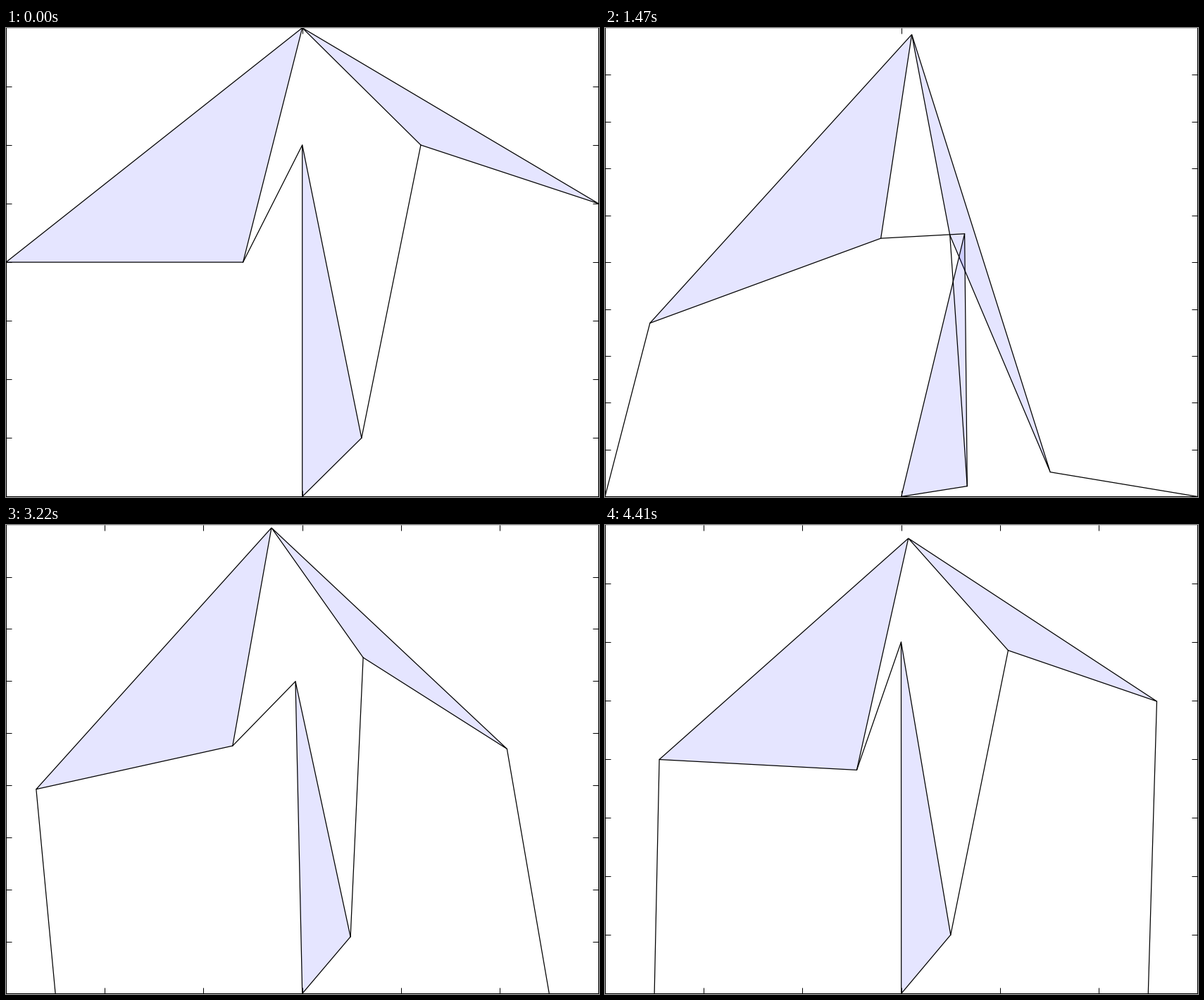
Animation, 842 px wide and 665 px high, one loop 4480 ms. Source, as a matplotlib script:

```python
import numpy as np
import matplotlib.pyplot as plt
from matplotlib.animation import FuncAnimation
from matplotlib.patches import Polygon

W, H, DPI = 842, 665, 100
PX = 72 / DPI
FRAMES, INTERVAL = 64, 70
LEFT, RIGHT, TOP, BOTTOM = 0.0, 841.4, -0.2, 664.4
TICK = 8.4

# Double butterfly linkage: three rigid triangles, four bars, three ground pivots.
PIVOT, FOOT_L, FOOT_R = 0j, -5 + 0j, 5 + 0j
CRANK = 2.5
FIRST_ANGLE, STEP, POSES, START_POSE = 66, 4, 32, 6
SUBSTEPS = 8
TRIANGLES = [(0, 1, 2), (0, 3, 4), (5, 6, 7)]
BARS = [(1, 8), (2, 6), (3, 7), (4, 9)]


def joints(turns, angle):
    """Top, left, left inner, right inner, right, middle, base, ground pivots."""
    a, b, c = np.exp(1j * np.asarray(turns))
    right = FOOT_R + CRANK * np.exp(1j * np.radians(angle))
    top = right - a * (5 - 1.5j)
    return np.array([top, top + b * (-5 - 2j), top + b * (-1 - 2j),
                     top + a * (2 - 1j), right, PIVOT,
                     c * 3j, c * (1 + 0.5j), FOOT_L, FOOT_R])


def residual(turns, angle):
    p = joints(turns, angle)
    bars = [p[i] - p[j] for i, j in BARS[:3]]
    return np.abs(bars) ** 2 - np.array([4, 2, 7.25])


def solve(guess, angle):
    turns, h = guess.copy(), 1e-6
    for _ in range(8):
        error = residual(turns, angle)
        if np.abs(error).max() < 1e-11:
            break
        jac = np.column_stack([
            (residual(turns + d, angle) - residual(turns - d, angle)) / (2 * h)
            for d in h * np.eye(3)])
        turns = turns - np.linalg.solve(jac, error)
    return turns


def trace(last_pose):
    """Follow the motion from the upright crank to the given pose."""
    direction = np.sign(last_pose - START_POSE)
    start = FIRST_ANGLE + STEP * START_POSE
    now = before = np.zeros(3)
    found = {START_POSE: joints(now, start)}
    for n in range(1, abs(last_pose - START_POSE) * SUBSTEPS + 1):
        angle = start + direction * n * STEP / SUBSTEPS
        now, before = solve(2 * now - before, angle), now
        if n % SUBSTEPS == 0:
            found[START_POSE + direction * n // SUBSTEPS] = joints(now, angle)
    return found


poses = {**trace(0), **trace(POSES - 1)}


def rounded(values, step):
    lo = np.floor(values.min() / step + 1e-4) * step
    hi = np.ceil(values.max() / step - 1e-4) * step
    return lo, hi, step


def axis_limits(points):
    x, y = points.real, points.imag
    x_step = 5 if np.ptp(x) < 10.0005 else 2
    y_step = 0.5 if y.min() > -1e-4 and y.max() < 5.0001 else 1
    return rounded(x, x_step), rounded(y, y_step)


def scale(values, limits, start, end):
    lo, hi, _ = limits
    return start + (values - lo) / (hi - lo) * (end - start)


def inner_ticks(limits):
    lo, hi, step = limits
    return lo + step * np.arange(1, round((hi - lo) / step))


fig = plt.figure(figsize=(W / DPI, H / DPI), dpi=DPI, facecolor="white")
ax = fig.add_axes([0, 0, 1, 1])
ax.set(xlim=(0, W), ylim=(H, 0))
ax.axis("off")

ax.plot([LEFT, RIGHT], [TOP, TOP], color="0.82", lw=PX)
ax.plot([LEFT, LEFT, RIGHT, RIGHT], [0, BOTTOM, BOTTOM, 0], color="black", lw=PX)
ticks, = ax.plot([], [], color="black", lw=PX, solid_capstyle="butt")
plates = [ax.add_patch(Polygon(np.zeros((3, 2)), facecolor=(0, 0, 1, 0.1),
                               edgecolor="black", lw=1.25 * PX, zorder=3))
          for _ in TRIANGLES]
rods = [ax.plot([], [], color="black", lw=1.25 * PX, zorder=4)[0] for _ in BARS]


def tick_marks(x_limits, y_limits):
    segments = []
    for x in scale(inner_ticks(x_limits), x_limits, LEFT, RIGHT):
        segments += [(x, BOTTOM), (x, BOTTOM - TICK), (np.nan, np.nan),
                     (x, TOP), (x, TOP + TICK), (np.nan, np.nan)]
    for y in scale(inner_ticks(y_limits), y_limits, BOTTOM, TOP):
        segments += [(LEFT, y), (LEFT + TICK, y), (np.nan, np.nan),
                     (RIGHT, y), (RIGHT - TICK, y), (np.nan, np.nan)]
    return np.array(segments).T


def update(frame):
    phase = (frame + START_POSE) % FRAMES
    points = poses[min(phase, FRAMES - 1 - phase)]
    x_limits, y_limits = axis_limits(points)
    xy = np.column_stack([scale(points.real, x_limits, LEFT, RIGHT),
                          scale(points.imag, y_limits, BOTTOM, TOP)])
    ticks.set_data(*tick_marks(x_limits, y_limits))
    for plate, corners in zip(plates, TRIANGLES):
        plate.set_xy(xy[list(corners)])
    for rod, ends in zip(rods, BARS):
        rod.set_data(*xy[list(ends)].T)
    return [ticks, *plates, *rods]


anim = FuncAnimation(fig, update, frames=FRAMES, interval=INTERVAL,
                     repeat=True, repeat_delay=0, blit=False)
plt.show()
```
